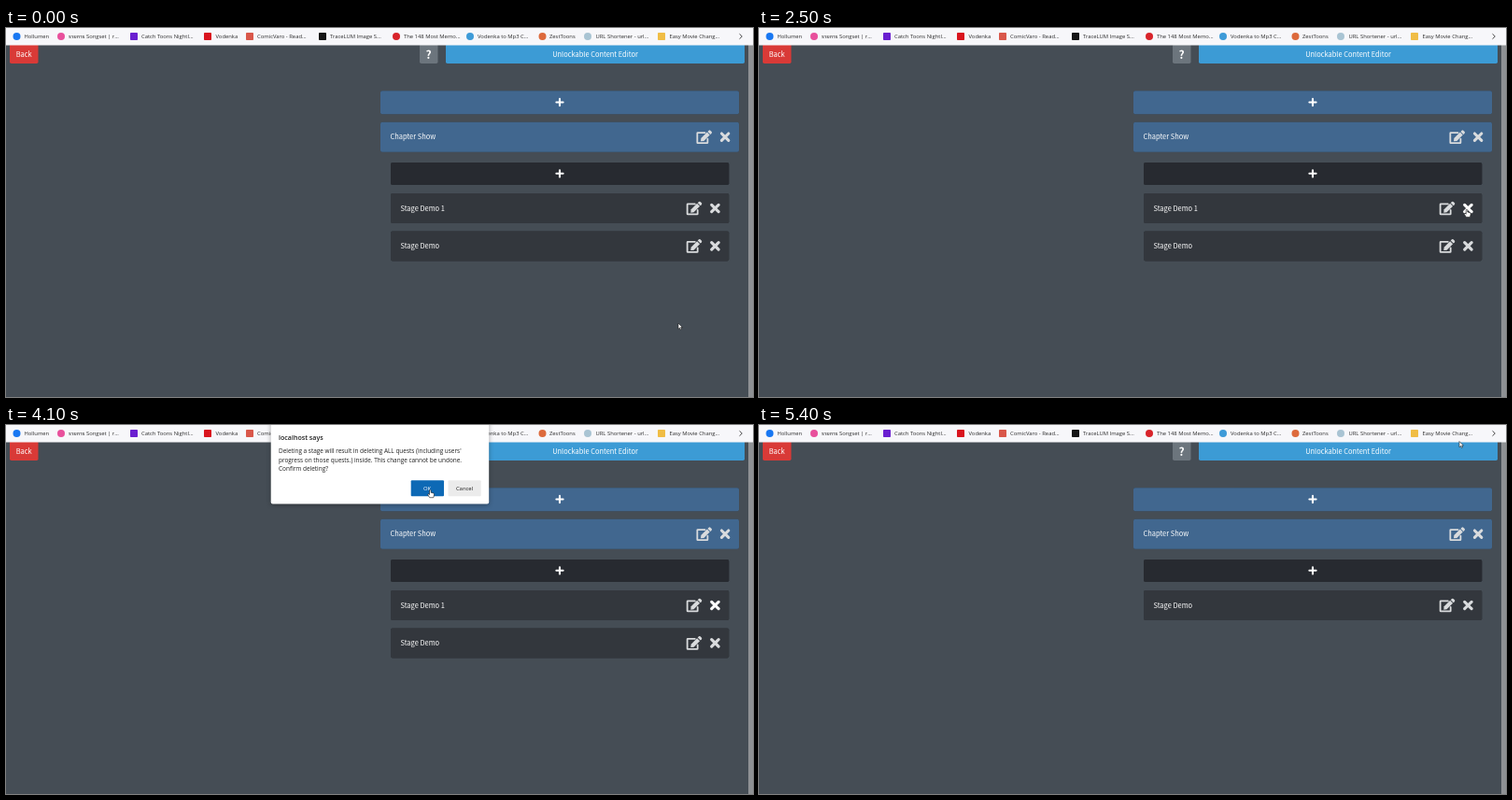
An HTML page for the animation above (5.5 s loop, 800 by 395 pixels).

```html
<!DOCTYPE html>
<html lang="en">
<head>
<meta charset="utf-8">
<title>Unlockable Content Editor</title>
<style>
html, body { margin: 0; width: 100%; height: 100%; overflow: hidden; background: #454d55; }
svg { display: block; width: 100%; height: 100%; }
text { white-space: pre; }
.page { font: 7.44px "Noto Sans CJK JP", "Noto Sans CJK SC", "Noto Sans", sans-serif; fill: #fff; }
.bar { font: 5.85px "Open Sans", "Noto Sans", "Noto Sans Thai", sans-serif; fill: #2b2b2b; }
.dialog { font: 6.45px "Open Sans", "Noto Sans", sans-serif; fill: #202020; }
.title { font-size: 7.1px; font-weight: 600; }
.small { font-size: 5.9px; }
.help { font-size: 12px; font-weight: 900; }
.mid { text-anchor: middle; }
.raised { filter: drop-shadow(0 .5px .6px rgba(0,0,0,.3)); }
.floating { filter: drop-shadow(0 1px 2.5px rgba(0,0,0,.35)); }
</style>
</head>
<body>
<svg id="stage" viewBox="0 0 800 395" xmlns="http://www.w3.org/2000/svg">
  <defs>
    <g id="plus" fill="none" stroke="#fff" stroke-width="2.1" stroke-linecap="round">
      <path d="M-3.6 0H3.6M0-3.6V3.6"/>
    </g>
    <g id="cross" fill="none" stroke="currentColor" stroke-width="3.1" stroke-linecap="round">
      <path d="M-3.7-3.7L3.7 3.7M3.7-3.7L-3.7 3.7"/>
    </g>
    <g id="edit" transform="scale(.0288) translate(-288 -256)" fill="currentColor">
      <path d="M318 96H48q-16 0-16 16V464q0 16 16 16H400q16 0 16-16V322"
        fill="none" stroke="currentColor" stroke-width="62" stroke-linecap="round"/>
      <path d="M396 78L498 180L274 406L160 418L171 301Z"/>
      <path d="M418 54L461 11Q488-10 516 11L565 60Q586 88 565 115L522 158Z"/>
    </g>
  </defs>
  <rect width="800" height="395" fill="#454d55"/>
  <g id="page" class="page"></g>
  <g id="bar" class="bar"></g>
  <g id="dialog" class="dialog"></g>
  <path id="arrow" d="M0 0V6.2L1.5 4.9L2.5 7L3.5 6.5L2.6 4.5H4.4Z"
    fill="#fff" stroke="#111" stroke-width=".55" stroke-linejoin="round"/>
  <path id="hand" d="M-.8.7Q0-.5.8.7V3L3.3 3.6Q4.4 4 4.2 5.3L3.5 8.4H-.6L-2.6 5.4Q-2.6 4.3-1.5 4.6L-.8 5.2Z"
    fill="#fff" stroke="#111" stroke-width=".6" stroke-linejoin="round"/>
</svg>
<script>
const LOOP = 5500, STEP = 100;
const $ = id => document.getElementById(id);

const rect = (x, y, w, h, fill, cls = "", r = 1.8) =>
  `<rect x="${x}" y="${y}" width="${w}" height="${h}" rx="${r}" fill="${fill}" class="${cls}"/>`;
const text = (x, y, s, cls = "", fill = "") =>
  `<text x="${x}" y="${y}" class="${cls}"${fill && ` style="fill:${fill}"`}>${s}</text>`;
const icon = (name, x, y, id = "") =>
  `<g ${id && `id="${id}"`} color="#d9dbdd" transform="translate(${x} ${y})"><use href="#${name}"/></g>`;

function card(x, y, w, fill, label, id) {
  const mid = y + 16, right = x + w;
  return `<g id="${id}">` + rect(x, y, w, 32, fill, "raised") +
    text(x + 10.5, mid + 2.7, label) +
    icon("edit", right - 37.3, mid) + icon("cross", right - 14.9, mid, id + "Cross") + "</g>";
}

$("page").innerHTML =
  rect(795, 18, 5, 377, "#8e9194", "", 0) +
  rect(4, 17, 30.5, 21, "#d93a37") + text(19.2, 31.4, "Back", "mid") +
  rect(443, 17, 19.5, 21, "#6c757d") + text(452.7, 32.7, "?", "mid help") +
  rect(471, 17, 320, 21, "#3c9bd5") + text(631, 31.4, "Unlockable Content Editor", "mid") +
  rect(401, 67.3, 384, 25, "#41678f", "raised") + icon("plus", 593, 79.5) +
  card(401, 100.7, 384, "#41678f", "Chapter Show", "chapter") +
  rect(412, 144, 362.3, 24, "#272a30", "raised") + icon("plus", 593, 155.8) +
  card(412, 177, 362.3, "#33373d", "Stage Demo 1", "first") +
  card(412, 217.4, 362.3, "#33373d", "Stage Demo", "second");

// Bookmark: icon centre, text start, label, colour, round icon?
const bookmarks = [
  [11.5, 19.5, "Hollumen", "#1877f2", 1],
  [59, 67, "รายการ Songset | r...", "#e8509c", 1],
  [137, 145, "Catch Toons Nightl...", "#6a1fd0", 0],
  [216, 224.5, "Vodenka", "#d9141e", 0],
  [261, 269, "ComicVaro - Read...", "#d9574a", 0],
  [339, 347, "TraceLUM Image S...", "#161616", 0],
  [418, 426, "The 148 Most Memo...", "#d8232a", 1],
  [497, 505, "Vodenka to Mp3 C...", "#3e9bd8", 1],
  [574.5, 582, "ZestToons", "#dd6a3c", 1],
  [623, 631.5, "URL Shortener - url...", "#a9c4d3", 1],
  [702, 710.5, "Easy Movie Chang...", "#f0bd45", 0]
];
$("bar").innerHTML = rect(0, 0, 800, 18.5, "#f7f7fa", "", 0) +
  bookmarks.map(([cx, x, label, color, round]) =>
    rect(cx - 4, 5, 8, 8, color, "", round ? 4 : .8) + text(x, 11.2, label)).join("") +
  `<path d="M785.5 6.3L788.3 9L785.5 11.7" fill="none" stroke="#333" stroke-width=".9"/>`;

$("dialog").innerHTML = rect(283.7, -12, 233.5, 96.4, "#fff", "floating", 2) +
  text(292, 15.7, "localhost says", "title") +
  ["Deleting a stage will result in deleting ALL quests (including users'",
   "progress on those quests.) inside. This change cannot be undone.",
   "Confirm deleting?"].map((line, i) => text(292, 30.3 + i * 9.5, line)).join("") +
  rect(433.7, 59.3, 35.3, 17, "#0d69b5", "", 1) + text(451, 70, "OK", "mid small", "#fff") +
  rect(473.5, 59.3, 35.2, 17, "#ebebeb", "", 1) + text(491, 70, "Cancel", "mid small");

// Pointer path: time, x, y
const path = [
  [0, 720, 316], [200, 724, 300], [600, 738, 224], [900, 742, 212], [1200, 705, 226],
  [1500, 655, 268], [1700, 648, 260.5], [1800, 650, 263], [2100, 690, 236],
  [2500, 758, 194], [2800, 758, 193], [2900, 648.5, 149], [3000, 570, 112],
  [3200, 470, 76], [3400, 453, 69.3], [4200, 454.5, 69.3], [4300, 610, 42],
  [4400, 775, 8.5], [4700, 777, 7], [5100, 751, 9], [5400, 750, 17.5], [5500, 750, 17.5]
];
// Dialog: time from, opacity, lift, scale
const fades = [[0, 0, 0, 1], [2900, .85, -3, 1.005], [3000, 1, 0, 1], [4200, .4, -6, 1.012], [4300, 0, 0, 1]];

function pointerAt(t) {
  const i = Math.max(1, path.findIndex(p => p[0] > t));
  const [t0, x0, y0] = path[i - 1], [t1, x1, y1] = path[i];
  const k = (t - t0) / (t1 - t0);
  return [x0 + (x1 - x0) * k, y0 + (y1 - y0) * k];
}

function draw(t) {
  const [x, y] = pointerAt(t);
  const hand = t >= 2500 && t < 4300;
  for (const id of ["arrow", "hand"]) {
    $(id).setAttribute("transform", `translate(${x} ${y})`);
    $(id).style.display = (id === "hand") === hand ? "" : "none";
  }

  const [, opacity, lift, scale] = fades.filter(f => f[0] <= t).pop();
  $("dialog").setAttribute("opacity", opacity);
  $("dialog").setAttribute("transform",
    `translate(${400.4 * (1 - scale)} ${lift}) scale(${scale} 1)`);

  const deleted = t >= 4200;
  $("second").style.display = deleted ? "none" : "";
  $("first").querySelector("text").textContent = deleted ? "Stage Demo" : "Stage Demo 1";
  $("firstCross").setAttribute("color", t >= 2500 && !deleted ? "#fff" : "#d9dbdd");
}

const start = performance.now();
function tick() {
  const t = (performance.now() - start) % LOOP;
  draw(Math.floor(t / STEP) * STEP);
  requestAnimationFrame(tick);
}
tick();
</script>
</body>
</html>
```
